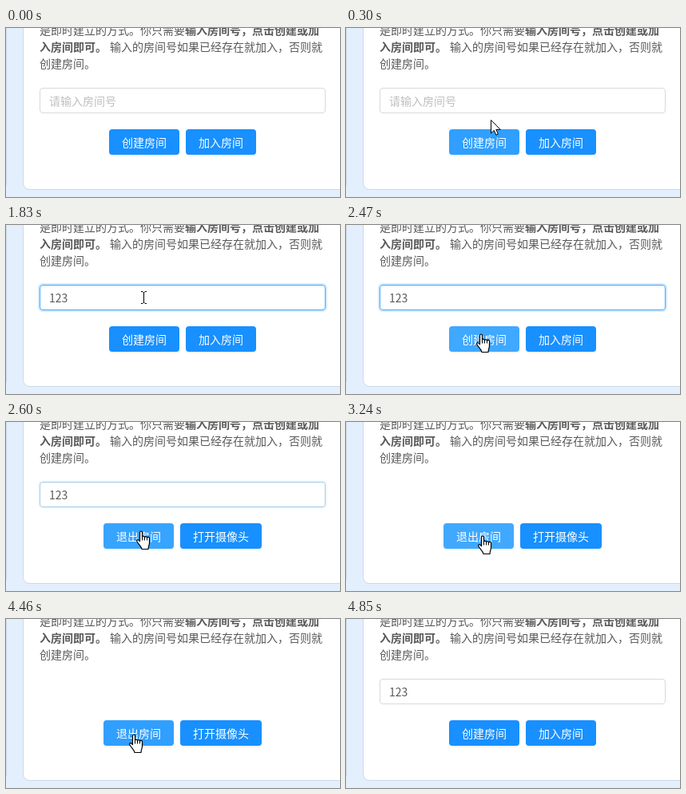
Recreate the animation shown at these times as an HTML page. Size 418x212 px, loop 5.27 s.

```html
<!DOCTYPE html>
<html lang="zh-CN">
<head>
<meta charset="utf-8">
<style>
  html, body { margin: 0; width: 100%; height: 100%; overflow: hidden; background: #e4effe; }
  svg { display: block; width: 418px; height: 212px; }
  text { font: 14px "Noto Sans CJK SC", "Noto Sans CJK JP", sans-serif; fill: #595959; white-space: pre; }
  .bold { font-weight: bold; }
  .button text { fill: #fff; }
  #placeholder { fill: #bfbfbf; }
  .pointer { fill: #fff; stroke: #000; stroke-linejoin: round; }
</style>
</head>
<body>
<svg viewBox="0 0 418 212">
  <path d="M.5 0V194q0 2-.5 4" fill="none" stroke="#cdd8e6"/>
  <rect x="21.5" y="-20" width="430" height="222.5" rx="8" fill="#fff" stroke="#cdd8e6"/>

  <text x="42" y="8">是即时建立的方式。你只需要</text>
  <text x="224" y="8" class="bold">输入房间号，点击创建或加</text>
  <text x="42" y="29" class="bold">入房间即可。</text>
  <text x="130" y="29">输入的房间号如果已经存在就加入，否则就</text>
  <text x="42" y="50">创建房间。</text>

  <g id="input">
    <rect id="ring" x="41" y="74" width="360" height="34" rx="5" fill="none" stroke="#1890ff" stroke-width="2"/>
    <rect id="field" x="42.5" y="75.5" width="357" height="31" rx="3.5" fill="#fff"/>
    <text id="placeholder" x="54" y="97">请输入房间号</text>
    <text id="value" x="54" y="97"></text>
    <rect id="caret" y="82" width="1" height="19" fill="#404040"/>
  </g>

  <g id="left" class="button">
    <rect y="129" width="88" height="32" rx="4" fill-opacity=".045"/>
    <rect y="127" width="88" height="32" rx="4"/>
    <text x="16" y="149"></text>
  </g>
  <g id="right" class="button">
    <rect y="129" height="32" rx="4" fill-opacity=".045"/>
    <rect y="127" height="32" rx="4"/>
    <text x="16" y="149"></text>
  </g>

  <g id="cursor">
    <path id="arrow" class="pointer" d="M.5.5V17L4.3 13.4 6.9 19.2 9.4 18.1 6.8 12.4H12.2Z"/>
    <path id="beam" fill="none" stroke="#000" d="M-3-7.5H-1L.5-6 2-7.5H4M.5-6V6M-3 7.5H-1L.5 6 2 7.5H4"/>
    <g id="hand" transform="translate(-6 -.5)">
      <path class="pointer" stroke-width="1.2" d="M4.5 13V2a1.5 1.5 0 0 1 3 0V8a1.5 1.5 0 0 1 3 .5 1.5 1.5 0 0 1 3 .5 1.5 1.5 0 0 1 3 .7V15c0 3-1.5 4-1.5 8H7C6.5 19.5 3 17 .9 13.5c-1-1.6.8-3.2 2.2-1.8Z"/>
      <path fill="none" stroke="#000" d="M7.5 7.5V12M10.5 8.5V12M13.5 9V12"/>
    </g>
  </g>
</svg>
<script>
const LOOP = 5270, JOINED = 2580, HIDDEN = 2880, LEFT_ROOM = 4540;
const $ = id => document.getElementById(id);
const show = (id, on) => $(id).style.display = on ? '' : 'none';

// Cursor path: time, x, y
const path = [
  [60, 218, 216], [300, 181, 115], [430, 173, 96], [600, 172, 91], [2160, 172, 91],
  [2300, 171, 118], [2470, 169, 137], [3210, 169, 137], [3240, 171, 143], [3540, 306, 214],
  [4180, 285, 214], [4210, 270, 205], [4340, 190, 158], [4460, 160, 145], [4550, 160, 145],
  [4710, 261, 173], [4850, 350, 216]
];
// Transitions: start time, target value
const buttonHover = [[130, 1], [290, 0], [2230, 1], [2470, .4], [2600, 1], [3300, 0], [4290, 1], [4450, .4], [4600, 0]];
const borderGlow = [[340, 1], [2430, 0]];
const focusGlow = [[430, 1], [2430, 0]];

const ease = p => p < .5 ? 4 * p ** 3 : 1 - 4 * (1 - p) ** 3;

function transition(steps, t) {
  let value = 0;
  steps.forEach(([start, target], i) => {
    if (t < start) return;
    const end = i + 1 < steps.length ? Math.min(t, steps[i + 1][0]) : t;
    value += (target - value) * ease(Math.min(1, (end - start) / 300));
  });
  return value;
}

function cursorAt(t) {
  const next = path.findIndex(key => key[0] > t);
  if (next < 0) return path[path.length - 1].slice(1);
  if (next === 0) return path[0].slice(1);
  const [t0, x0, y0] = path[next - 1], [t1, x1, y1] = path[next];
  const p = (t - t0) / (t1 - t0);
  return [Math.round(x0 + (x1 - x0) * p), Math.round(y0 + (y1 - y0) * p)];
}

function mix(from, to, p) {
  return `rgb(${from.map((c, i) => Math.round(c + (to[i] - c) * p))})`;
}

function setButton(id, x, width, label, hover) {
  const [shadow, face, text] = $(id).children;
  $(id).setAttribute('transform', `translate(${x})`);
  shadow.setAttribute('width', width);
  face.setAttribute('width', width);
  face.setAttribute('fill', mix([24, 144, 255], [64, 169, 255], hover));
  text.textContent = label;
}

function drawInput(t) {
  const typed = t < 1190 ? '' : t < 1310 ? '12' : '123';
  const caretOn = t >= 430 && t < 950 || t >= 1190 && t < 1830 || t >= 2360 && t < 2430;
  show('input', t < HIDDEN || t >= LEFT_ROOM);
  show('placeholder', !typed);
  show('caret', caretOn);
  $('value').textContent = typed;
  $('caret').setAttribute('x', Math.floor(54 + 7.77 * typed.length));
  $('field').setAttribute('stroke', mix([217, 217, 217], [64, 169, 255], transition(borderGlow, t)));
  $('ring').setAttribute('opacity', .2 * transition(focusGlow, t));
}

function drawCursor(t, inRoom) {
  const [x, y] = cursorAt(t);
  const left = inRoom ? 122 : 129;
  const overButton = x >= left && x < left + 88 && y >= 127 && y < 159;
  const overInput = !inRoom && x >= 42 && x < 400 && y >= 75 && y < 107;
  $('cursor').setAttribute('transform', `translate(${x} ${y})`);
  show('hand', overButton);
  show('beam', overInput);
  show('arrow', !overButton && !overInput);
}

function draw(now) {
  const t = now % LOOP;
  const inRoom = t >= JOINED && t < LEFT_ROOM;
  const hover = transition(buttonHover, t);
  drawInput(t);
  if (inRoom) {
    setButton('left', 122, 88, '退出房间', hover);
    setButton('right', 218, 102, '打开摄像头', 0);
  } else {
    setButton('left', 129, 88, '创建房间', hover);
    setButton('right', 225, 88, '加入房间', 0);
  }
  drawCursor(t, inRoom);
}

const began = performance.now();
function tick() {
  draw(performance.now() - began);
  requestAnimationFrame(tick);
}
tick();
</script>
</body>
</html>
```
